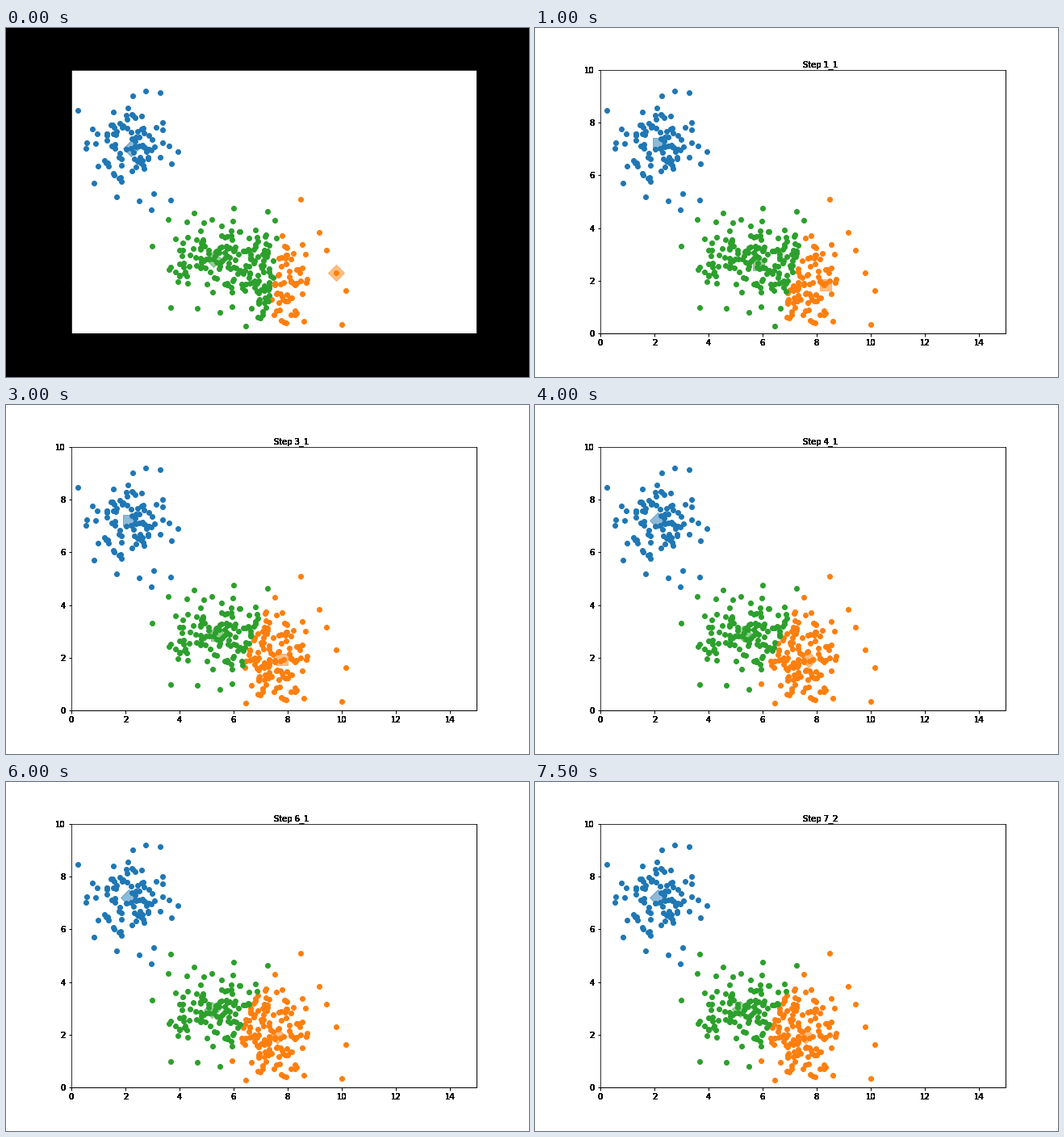
Recreate the animation shown at these times as a matplotlib script. Size 648x432 px, loop 8 s.

```python
import numpy as np
import matplotlib.pyplot as plt
from matplotlib.animation import FuncAnimation

FRAMES, STEP_MS = 16, 500
COLORS = ["tab:blue", "tab:orange", "tab:green"]
DECAY = .55

plt.rcParams.update({"font.family": "DejaVu Sans", "font.size": 10})

# Centroids (blue, orange, green): seeds, after one update, at rest
SEEDS = np.array([(2.22, 7.02), (9.80, 2.30), (5.26, 2.82)])
FIRST = np.array([(2.14, 7.20), (8.33, 1.84), (5.85, 2.62)])
REST = np.array([(2.12, 7.21), (7.58, 1.96), (5.16, 2.97)])

# The most isolated points, upper cloud first
STRAYS = [
    (.24, 8.46), (2.26, 9.0), (2.75, 9.2), (3.29, 9.14), (3.95, 6.9), (3.7, 6.44),
    (3.05, 5.3), (3.68, 5.05), (2.97, 4.68), (2.5, 5.03), (1.67, 5.17), (.85, 5.7),
    (3.58, 4.33), (4.54, 4.56), (6.0, 4.76), (7.26, 4.63), (7.54, 4.29), (2.98, 3.3),
    (3.68, .99), (4.66, .96), (5.49, .79), (5.95, 1.02), (6.46, .29), (8.59, .45),
    (10.0, .35), (10.15, 1.61), (9.45, 3.16), (9.17, 3.84), (8.48, 5.1),
]

rng = np.random.default_rng(11)


def cloud(count, mean, std, radii):
    """Normal samples kept inside an ellipse around the mean."""
    pts = rng.normal(mean, std, (count * 8, 2))
    inside = (((pts - mean) / radii) ** 2).sum(axis=1) < 1
    return pts[inside][:count]


def centers(n):
    """Centroids after n updates, settling geometrically."""
    if n == 0:
        return SEEDS
    return REST + (FIRST - REST) * DECAY ** (n - 1)


points = np.vstack([
    STRAYS, SEEDS,
    cloud(86, (2.05, 7.2), (1.0, 1.0), (1.6, 1.5)),
    cloud(125, (5.3, 2.95), (1.1, .9), (1.95, 1.55)),
    cloud(118, (7.55, 2.05), (.8, .95), (1.6, 1.75)),
])

fig = plt.figure(figsize=(9, 6), dpi=72)
ax = fig.add_axes([.125, .125, .775, .755])


def heavy(draw, *args, **kw):
    """Overprint text so that its soft edges turn solid."""
    return [draw(*args, **kw) for _ in range(16)]


ax.set(xlim=(0, 15), ylim=(0, 10), xticks=range(0, 15, 2), yticks=range(0, 11, 2))
ax.tick_params(labelbottom=False, labelleft=False, width=1)
for side in ("right", "bottom"):
    ax.spines[side].set_linewidth(1)
for v in range(0, 15, 2):
    heavy(ax.annotate, str(v), (v, 0), xytext=(0, -7),
          textcoords="offset points", ha="center", va="top")
for v in range(0, 11, 2):
    heavy(ax.annotate, str(v), (0, v), xytext=(-7, 0),
          textcoords="offset points", ha="right", va="center_baseline")
titles = heavy(ax.text, .5, 1.013, "", transform=ax.transAxes)

dots = [ax.scatter([], [], color=c) for c in COLORS]
marks = {m: [ax.scatter([], [], s=200, marker=m, color=c, alpha=.5) for c in COLORS]
         for m in "Ds"}


def update(k):
    step, half = divmod(k, 2)
    moves = step + half
    fig.set_facecolor("black" if k == 0 else "white")
    for t in titles:
        t.set_text(f"Step {step}_{half + 1}")

    dist = np.linalg.norm(points[:, None] - centers(step), axis=2)
    owner = dist.argmin(axis=1)
    shown = "Ds"[moves % 2]
    for i, d in enumerate(dots):
        d.set_offsets(points[owner == i])
        for m, group in marks.items():
            group[i].set_visible(m == shown)
            group[i].set_offsets(centers(moves)[i])
    return dots


anim = FuncAnimation(fig, update, frames=FRAMES, interval=STEP_MS,
                     repeat=True, repeat_delay=0, blit=False)
plt.show()
```
